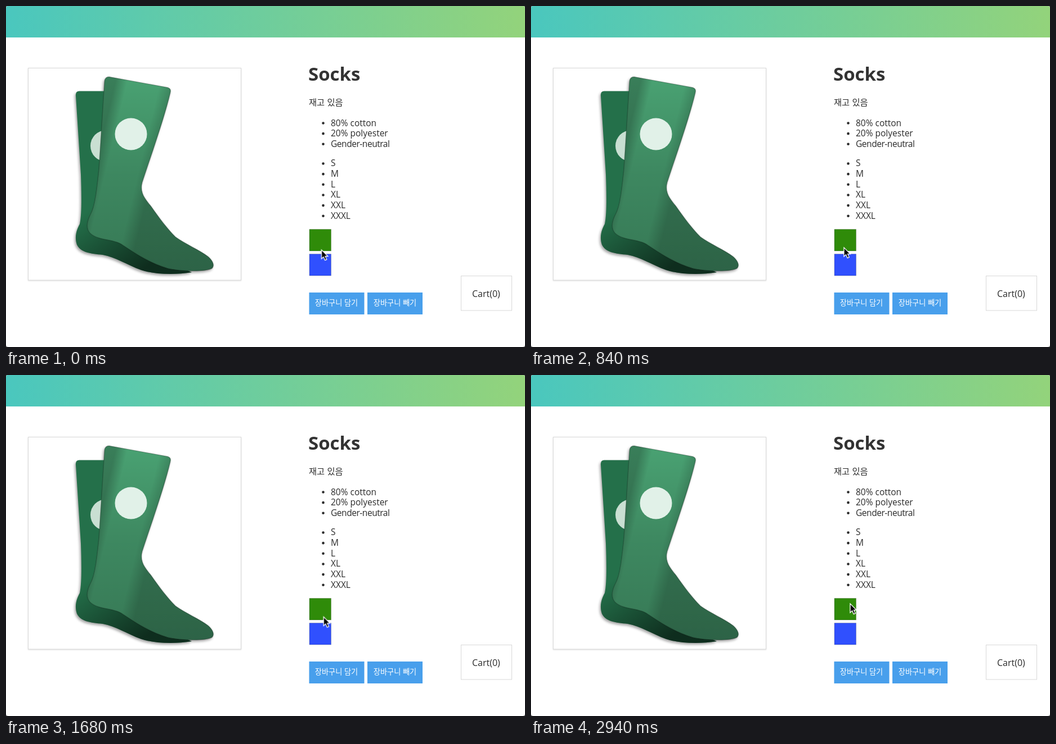
Recreate the animation shown at these times as an HTML page. Size 922 by 607 pixels, loop 3.01 s.

```html
<!DOCTYPE html>
<html lang="ko">
<head>
<meta charset="utf-8">
<title>Socks</title>
<style>
  html, body { margin: 0; width: 100%; height: 100%; overflow: hidden; background: #666; }
  svg {
    display: block; width: 922px; height: 607px;
    --front: #49a172; --back: #24704a; --badge: #e1f1e8; --badge-back: #c9dfd2; --add: #489fec;
    animation: variant 3010ms step-end infinite;
  }
  text { font: 15.5px "Open Sans", "Noto Sans", sans-serif; fill: #2b2b2b; }
  .title { font-size: 33px; font-weight: 700; fill: #333; }
  .tight { letter-spacing: -.45px; }
  .ko { font: 15.3px "Noto Sans CJK KR", "Noto Sans CJK", sans-serif; }
  .label { font: 500 13.2px "Noto Sans CJK KR", "Noto Sans CJK", sans-serif; fill: #fff; text-anchor: middle; }
  .box { fill: #fff; stroke: #d8d8d8; }
  .bullets { stroke: #2b2b2b; stroke-width: 4.6; stroke-linecap: round; stroke-dasharray: 0 18.65; }
  .photo { filter: drop-shadow(-2px 3px 2px rgba(0, 0, 0, .35)); }
  .frame { filter: drop-shadow(0 1px 1px rgba(0, 0, 0, .12)); }
  .front { fill: var(--front); }
  .back { fill: var(--back); }
  .badge { fill: var(--badge); }
  .badge-back { fill: var(--badge-back); }
  .add { fill: var(--add); }
  .in { animation: in-stock 3010ms step-end infinite; }
  .out { animation: sold-out 3010ms step-end infinite; }
  .pointer { fill: #000; stroke: #fff; stroke-width: 1.3; animation: move 3010ms infinite; }

  /* Blue variant is hovered from 910 ms to 1680 ms. */
  @keyframes variant {
    30.23% { --front: #506a8e; --back: #34445e; --badge: #e4e6e9; --badge-back: #c6cad1; --add: #dcdcdc; }
    55.81% { --front: #49a172; --back: #24704a; --badge: #e1f1e8; --badge-back: #c9dfd2; --add: #489fec; }
  }
  @keyframes in-stock { 0%, 55.81% { opacity: 1; } 30.23% { opacity: 0; } }
  @keyframes sold-out { 0%, 55.81% { opacity: 0; } 30.23% { opacity: 1; } }
  @keyframes move {
    0% { transform: translate(560.5px, 434px); animation-timing-function: steps(6); }
    13.95% { transform: translate(556.5px, 433px); animation-timing-function: steps(4); }
    23.25% { transform: translate(554.5px, 415.5px); animation-timing-function: steps(5); }
    34.88% { transform: translate(558px, 451.5px); animation-timing-function: steps(6); }
    48.83% { transform: translate(564px, 445px); animation-timing-function: steps(7); }
    65.11% { transform: translate(564.5px, 411px); animation-timing-function: steps(14); }
    97.67%, 100% { transform: translate(567px, 407px); }
  }
</style>
</head>
<body>
<svg viewBox="0 0 922 607">
  <defs>
    <linearGradient id="nav">
      <stop offset="0" stop-color="#4ac7be"/>
      <stop offset="1" stop-color="#93d37b"/>
    </linearGradient>
    <linearGradient id="depth" gradientUnits="userSpaceOnUse" x1="235" y1="130" x2="235" y2="470">
      <stop offset="0" stop-opacity="0"/>
      <stop offset=".5" stop-opacity=".16"/>
      <stop offset="1" stop-opacity=".25"/>
    </linearGradient>
    <linearGradient id="side" gradientUnits="userSpaceOnUse" x1="162" y1="270" x2="262" y2="294">
      <stop offset="0" stop-opacity=".22"/>
      <stop offset=".2" stop-opacity="0"/>
      <stop offset=".75" stop-opacity="0"/>
      <stop offset="1" stop-opacity=".18"/>
    </linearGradient>
    <linearGradient id="under" gradientUnits="userSpaceOnUse" x1="150" y1="360" x2="235" y2="475">
      <stop offset="0" stop-opacity="0"/>
      <stop offset="1" stop-opacity=".6"/>
    </linearGradient>
    <path id="backSock" d="M130 151.500H200V420L330 474C300 479 265 478 240 470C215 461 195 447 172 443C150 441 133 439 126 425C121 410 126 397 131 388C135 370 134 330 133 300L124 160Q123 152 130 151.500Z"/>
    <path id="frontSock" d="M183 126L287 145Q294 147 292 154C281 201 258 265 242 314C237 333 248 344 258 357C272 377 286 396 301 411C319 424 343 434 359 446C368 454 371 462 366 467C354 474 306 472 287 467C251 456 226 438 205 424C189 414 163 418 149 404C141 395 144 382 151 369C159 353 162 318 165 290L175 134Q176 126 183 126Z"/>
  </defs>

  <rect width="922" height="607" rx="4" fill="#fff"/>
  <path d="M0 56V4Q0 0 4 0H918Q922 0 922 4V56Z" fill="url(#nav)"/>

  <rect class="box frame" x="39.500" y="110.500" width="378" height="377.500"/>
  <g class="photo">
    <use href="#backSock" class="back"/>
    <use href="#backSock" fill="url(#under)"/>
    <circle class="badge-back" cx="178" cy="249" r="28"/>
    <use href="#frontSock" class="front"/>
    <use href="#frontSock" fill="url(#depth)"/>
    <use href="#frontSock" fill="url(#side)"/>
    <use href="#frontSock" fill="none" stroke="#000" stroke-opacity=".22" stroke-width="1.500"/>
    <circle class="badge" cx="222" cy="228" r="28.500"/>
  </g>

  <text class="title" x="537" y="132.500">Socks</text>
  <text class="ko in" x="538" y="176.500">재고 있음</text>
  <text class="ko out" x="538" y="176.500">재고 없음</text>

  <path class="bullets" d="M563.500 208.500v37.400M563.500 280.500v93.400"/>
  <text>
    <tspan x="577" y="213.500">80% cotton</tspan>
    <tspan x="577" dy="18.650">20% polyester</tspan>
    <tspan x="577" dy="18.650" class="tight">Gender-neutral</tspan>
    <tspan x="577" y="285.300">S</tspan>
    <tspan x="577" dy="18.650">M</tspan>
    <tspan x="577" dy="18.650">L</tspan>
    <tspan x="577" dy="18.650">XL</tspan>
    <tspan x="577" dy="18.650">XXL</tspan>
    <tspan x="577" dy="18.650">XXXL</tspan>
  </text>

  <g stroke="#000" stroke-opacity=".2">
    <rect x="539" y="397.500" width="38.500" height="38.500" fill="#2f8b09"/>
    <rect x="539" y="441.500" width="38.500" height="38.500" fill="#3050fe"/>
  </g>

  <rect class="add" x="538.500" y="510" width="98" height="39"/>
  <rect x="642" y="510" width="98" height="39" fill="#489fec"/>
  <text class="label" x="587" y="533">장바구니 담기</text>
  <text class="label" x="691" y="533">장바구니 빼기</text>

  <rect class="box" x="808.500" y="480.500" width="90" height="61.500"/>
  <text x="828" y="517.500" style="font-size:16px">Cart(0)</text>

  <path class="pointer" d="M0 0V16L3.600 12.600L6.200 18.600L9.200 17.300L6.600 11.500H11.400Z"/>
</svg>
</body>
</html>
```
